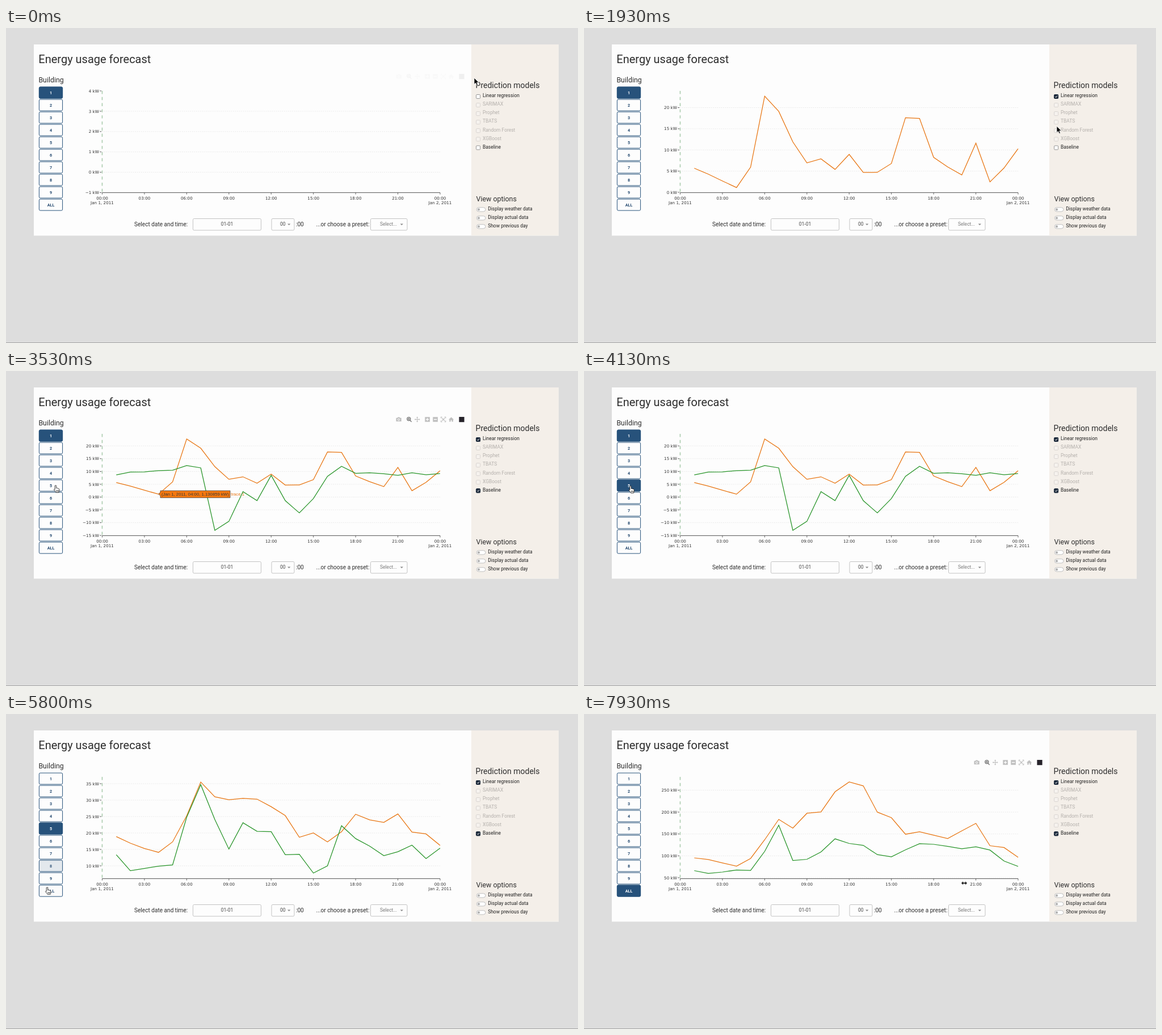
An HTML page for the animation above (8 s loop, 1008 px wide and 556 px high).

```html
<!DOCTYPE html>
<html lang="en">
<head>
<meta charset="utf-8">
<title>Energy usage forecast</title>
<style>
html, body { margin: 0; width: 100%; height: 100%; overflow: hidden; background: #ddd; }
svg { display: block; width: 1008px; height: 556px; font-family: Roboto, sans-serif; }
.plot { font: 7.2px "DejaVu Sans", sans-serif; fill: #333; }
.line { fill: none; stroke-width: 1.25; }
.hover { font: 7.75px "Liberation Sans", Arial, sans-serif; }
.icon { fill: none; stroke: #bfbfbf; stroke-width: 1.3; }
.field { fill: #fdfdfd; stroke: #c3c3c3; }

/* hard switches and fades share one 8 s clock */
.chart, .tick, .hover, .cur { animation: 8s step-end infinite; visibility: hidden; }
.on, #bar, #pointer { animation: 8s linear infinite; }
.on { opacity: 0; }

#chart0 { animation-name: chart0; }
#chart1 { animation-name: chart1; }
#chart2 { animation-name: chart2; }
#chart3 { animation-name: chart3; }
#chart4 { animation-name: chart4; }
@keyframes chart0 { 0% { visibility: visible } 13.33%, to { visibility: hidden } }
@keyframes chart1 { 0% { visibility: hidden } 13.33% { visibility: visible } 34.17%, to { visibility: hidden } }
@keyframes chart2 { 0% { visibility: hidden } 34.17% { visibility: visible } 65.83%, to { visibility: hidden } }
@keyframes chart3 { 0% { visibility: hidden } 65.83% { visibility: visible } 80%, to { visibility: hidden } }
@keyframes chart4 { 0% { visibility: hidden } 80%, to { visibility: visible } }

#tick0 { animation-name: tick0; }
#tick6 { animation-name: tick6; }
@keyframes tick0 { 0% { visibility: hidden } 7.5%, to { visibility: visible } }
@keyframes tick6 { 0% { visibility: hidden } 30%, to { visibility: visible } }

#on1 { animation-name: on1; }
#on5 { animation-name: on5; }
#on8 { animation-name: on8; }
#onALL { animation-name: onALL; }
@keyframes on1 { 0%, 61.12% { opacity: 1 } 62.88%, to { opacity: 0 } }
@keyframes on5 {
  0%, 44.15% { opacity: 0 } 45.4% { opacity: .8 } 46.8%, 49% { opacity: 0 }
  50.8%, 75.6% { opacity: 1 } 77.4%, to { opacity: 0 }
}
@keyframes on8 { 0%, 70.8% { opacity: 0 } 71.7% { opacity: .25 } 72.5% { opacity: .12 } 73.6%, to { opacity: 0 } }
@keyframes onALL { 0%, 72.5% { opacity: 0 } 74.4%, to { opacity: 1 } }

#bar { animation-name: bar; }
@keyframes bar {
  0% { opacity: .06 } .87%, 40.87% { opacity: 0 } 42.5%, 44.8% { opacity: 1 }
  47.5%, 91.2% { opacity: 0 } 93.3%, to { opacity: 1 }
}
.hover { animation-name: hover; }
@keyframes hover { 0% { visibility: hidden } 43.3% { visibility: visible } 45%, to { visibility: hidden } }

#pointer { animation-name: move; }
@keyframes move {
  0% { transform: translate(825px, 88px); animation-timing-function: ease-in-out }
  5%, 17.5% { transform: translate(830px, 117px); animation-timing-function: ease-in-out }
  24.12% { transform: translate(833px, 173px); animation-timing-function: ease-out }
  28.4%, 40% { transform: translate(831px, 207px); animation-timing-function: ease-in }
  41.6% { transform: translate(600px, 212px) }
  43.3% { transform: translate(262px, 214px); animation-timing-function: ease-out }
  44.12% { transform: translate(88px, 202px) }
  46.2% { transform: translate(20px, 205px); animation-timing-function: ease-in-out }
  50%, 58% { transform: translate(82px, 203px) }
  60.87%, 70% { transform: translate(76px, 200px); animation-timing-function: ease-in-out }
  72.5% { transform: translate(72.5px, 306px); animation-timing-function: ease-out }
  75%, 89% { transform: translate(75.5px, 309px); animation-timing-function: ease-in }
  93.4% { transform: translate(245px, 303px); animation-timing-function: ease-out }
  99.1%, to { transform: translate(670px, 298.5px) }
}
#arrow { animation-name: arrow; }
#hand { animation-name: hand; }
#resize { animation-name: resize; }
@keyframes arrow {
  0% { visibility: visible } 44% { visibility: hidden } 44.9% { visibility: visible }
  48.7% { visibility: hidden } 60.8% { visibility: visible } 70.7% { visibility: hidden }
  90.5% { visibility: visible } 92.4%, to { visibility: hidden }
}
@keyframes hand {
  0% { visibility: hidden } 44% { visibility: visible } 44.9% { visibility: hidden }
  48.7% { visibility: visible } 60.8% { visibility: hidden } 70.7% { visibility: visible }
  90.5%, to { visibility: hidden }
}
@keyframes resize { 0% { visibility: hidden } 92.4%, to { visibility: visible } }
</style>
</head>
<body>
<svg viewBox="0 0 1008 556">
  <rect width="1008" height="556" fill="#ddd"/>
  <path d="M0 555.5H1008" stroke="#a2a2a2"/>
  <rect x="49" y="29" width="925" height="337.5" fill="#fdfdfd"/>
  <rect x="820" y="29" width="154" height="337.5" fill="#f4efe9"/>

  <g fill="#2d2d2d">
    <text x="57.3" y="62" font-size="20">Energy usage forecast</text>
    <text x="57.4" y="96" font-size="12.4">Building</text>
    <text x="827.6" y="106" font-size="14">Prediction models</text>
    <text x="828.6" y="305.7" font-size="12.4">View options</text>
    <g font-size="10.1">
      <text x="226" y="349.6">Select date and time:</text>
      <text x="511" y="349.6">:00</text>
      <text x="546.6" y="349.6">...or choose a preset:</text>
    </g>
  </g>

  <g class="field">
    <rect x="329.5" y="336.5" width="120" height="20.5" rx="2"/>
    <rect x="468" y="336.5" width="40" height="20.5" rx="2"/>
    <rect x="642.5" y="336.5" width="64.5" height="20.5" rx="2"/>
  </g>
  <g font-size="8.5" fill="#444">
    <text x="389.5" y="349.4" text-anchor="middle">01-01</text>
    <text x="483" y="349.4">00</text>
    <text x="659" y="349.4" fill="#7b7b7b">Select...</text>
    <path d="M496 345.5h5.4l-2.7 2.8zM694.6 345.5h5.4l-2.7 2.8z" fill="#8c8c8c"/>
  </g>

  <g id="buttons" font-size="7.2" font-weight="700" text-anchor="middle"></g>
  <g id="options" font-size="8.46"></g>
  <g id="plot" class="plot"></g>

  <g class="hover">
    <path d="M269 217.3l3-3v-3h123v12.4h-123v-3.4z" fill="#f5780f" stroke="#444" stroke-width=".8"/>
    <text x="274" y="220.1" fill="#3a3a3a">(Jan 1, 2011, 04:00, 1.130859 kW)</text>
    <text x="396.3" y="220.1" fill="#e87511">trace 1</text>
  </g>

  <g id="bar">
    <path d="M687.5 82.8h2.2l.9-1.3h3l.9 1.3h2.2v6.2h-9.2z" fill="#bfbfbf"/>
    <circle cx="692" cy="85.8" r="1.7" fill="#bfbfbf" stroke="#fdfdfd"/>
    <g class="icon">
      <g stroke="#727272"><circle cx="709.8" cy="84.6" r="3"/><path d="M712 87l2.6 2.7M708.2 84.6h3.2M709.8 83v3.2"/></g>
      <path d="M720.5 85.5h8.4M724.7 81.3v8.4" stroke-width="1.1"/>
      <path d="M719.8 85.5l2-1.7v3.4zM729.6 85.5l-2-1.7v3.4zM724.7 80.6l-1.7 2h3.4zM724.7 90.4l-1.7-2h3.4z" fill="#bfbfbf" stroke="none"/>
      <path d="M738.3 81.2h8.6v8.6h-8.6zM752.3 81.2h8.6v8.6h-8.6z" fill="#bfbfbf" stroke="none"/>
      <path d="M740 85.5h5.2M742.6 82.9v5.2M754 85.5h5.2" stroke="#fdfdfd"/>
      <path d="M766.5 83.4v-2h2M772.8 81.4h2v2M774.8 87.6v2h-2M768.5 89.6h-2v-2M768 83l5.3 5M773.3 83l-5.3 5" stroke-width="1.1"/>
      <path d="M780 85.7l4.6-4.2 4.6 4.2h-1.3v3.8h-2.4v-2.7h-1.8v2.7h-2.4v-3.8z" fill="#bfbfbf" stroke="none"/>
    </g>
    <rect x="798.4" y="81" width="9.2" height="9.2" fill="#27242b"/>
  </g>

  <g id="pointer">
    <path id="arrow" class="cur" d="M0 0v11.4l2.6-2.4 1.9 4.2 2-.9-1.8-4.1h3.6z" fill="#000" stroke="#fff" stroke-width=".8"/>
    <path id="hand" class="cur" d="M-1.2 1a1.2 1.2 0 0 1 2.4 0v3.8c.6-.6 1.7-.4 1.9.3.6-.4 1.6-.2 1.8.6.7-.3 1.5.1 1.5 1v2.4c0 1.4-.9 2-.9 3.2H.6c-.2-1.2-2.4-3-3.3-4.5-.5-1 .6-1.7 1.5-.8zM1.4 8.4v2.2M3 8.4v2.2M4.6 8.4v2.2" fill="#fff" stroke="#000" stroke-width=".8"/>
    <path id="resize" class="cur" d="M-5.4 0l3.6-3.4v2.2h3.6v-2.2l3.6 3.4-3.6 3.4v-2.2h-3.6v2.2z" fill="#000" stroke="#fff" stroke-width=".7"/>
  </g>
</svg>

<script>
const $ = id => document.getElementById(id);
const navy = '#27527b';
const text = (x, y, s, extra = '') => `<text x="${x}" y="${y}" ${extra}>${s}</text>`;

// building buttons: plain face with a filled face faded over it
$('buttons').innerHTML = [1, 2, 3, 4, 5, 6, 7, 8, 9, 'ALL'].map((name, i) => {
  const y = 114 + i * 22;
  const face = (fill, ink) =>
    `<rect x="58.4" y="${y - 9.9}" width="41.2" height="20" rx="2" fill="${fill}" stroke="${navy}"/>` +
    text(79, y + 2.6, name, `fill="${ink}"`);
  return face('#fdfdfd', '#254a70') + `<g id="on${name}" class="on">${face(navy, '#fff')}</g>`;
}).join('');

const models = ['Linear regression', 'SARIMAX', 'Prophet', 'TBATS', 'Random Forest', 'XGBoost', 'Baseline'];
const views = ['Display weather data', 'Display actual data', 'Show previous day'];

$('options').innerHTML = models.map((name, i) => {
  const y = 121 + i * 15.05, live = i % 6 === 0;
  const box = `<rect x="828.6" y="${y - 3.5}" width="7" height="7" rx="1.2" `;
  return box + `fill="${live ? '#fff' : '#f6f2ee'}" stroke="${live ? '#8b8b8b' : '#d6d2ce'}" stroke-width=".9"/>` +
    (live ? `<g id="tick${i}" class="tick">${box}fill="#1d2b3c" stroke="#1d2b3c"/>` +
      `<path d="M830.3 ${y}l1.4 1.5 2.5-3" fill="none" stroke="#fff"/></g>` : '') +
    text(840, y + 1.3, name, `fill="${live ? '#222' : '#b4b0ac'}"`);
}).join('') + views.map((name, i) => {
  const y = 320.4 + i * 15;
  return `<rect x="829.3" y="${y - 3.6}" width="15.6" height="7.2" rx="3.6" fill="#fff" stroke="#b9b9b9" stroke-width=".9"/>` +
    `<circle cx="833" cy="${y}" r="2.1" fill="#b0b0b0"/>` + text(849.2, y + 1.8, name, 'fill="#222"');
}).join('');

// hourly forecasts in kW, 01:00 to 24:00
const linear1 = [5.69, 4.28, 2.68, 1.13, 5.95, 22.7, 19.1, 11.9, 6.96, 7.9, 5.4, 8.96,
  4.7, 4.72, 6.8, 17.6, 17.45, 8.25, 6, 4.1, 11.6, 2.45, 5.75, 10.3];
const base1 = [8.65, 9.8, 9.83, 10.35, 10.5, 12.3, 11.4, -13, -9.5, 2.1, -1.4, 8.5,
  -1.4, -6.2, -.6, 8.1, 12, 9.3, 9.5, 9.1, 8.5, 9.5, 8.75, 9.2];
const linear5 = [18.9, 16.9, 15.3, 14.1, 17.3, 25.2, 35.5, 31, 30.1, 30.55, 30.3, 28,
  25.3, 18.7, 20, 17.3, 20.4, 25.7, 24, 23.2, 25.8, 20.3, 19.7, 16.2];
const base5 = [13.4, 8.5, 9.2, 9.9, 10.3, 24.8, 34.7, 24.1, 15.1, 23.1, 20.5, 20.4,
  13.4, 13.5, 7.8, 10, 22.2, 18.3, 16, 13.1, 14.3, 16.3, 12.2, 15.4];
const linearAll = [95.3, 91.7, 83.9, 76.5, 94, 136.7, 183.3, 163.3, 197.3, 200.2, 246.4, 268.8,
  260, 199.9, 187.2, 149.4, 155.1, 147.3, 139.6, 157.2, 174.3, 123.1, 118.9, 96.6];
const baseAll = [66.2, 60, 62.9, 67.7, 66.8, 110.2, 170, 89.5, 92.1, 108.9, 138.9, 128.3,
  124, 102.8, 97.9, 113.7, 127.7, 126.4, 121.6, 116.3, 120.8, 113.2, 88.2, 75.9];

// zero: y of 0 kW, k: pixels per kW
const charts = [
  { zero: 254.6, k: 35.9, from: -1, to: 4, step: 1, data: [] },
  { zero: 290, k: 7.475, from: 0, to: 20, step: 5, data: [linear1] },
  { zero: 222.5, k: 4.515, from: -15, to: 20, step: 5, data: [linear1, base1] },
  { zero: 326, k: 5.8, from: 10, to: 35, step: 5, data: [linear5, base5] },
  { zero: 327.6, k: .7725, from: 50, to: 250, step: 50, data: [linearAll, baseAll] },
];
const left = 169.5, right = 765;
const hourX = h => left + (right - left) * h / 24;

function drawChart({ zero, k, from, to, step, data }, i) {
  let out = '';
  for (let v = from; v <= to; v += step) {
    const y = zero - v * k;
    if (y > 115 && y < 289.5)
      out += `<path d="M${left} ${y}H${right}" stroke="#e4e4e4" stroke-width=".8" stroke-dasharray="1.8 1.8"/>`;
    out += `<path d="M165 ${y}h3.4" stroke="#444" stroke-width=".8"/>` +
      text(163.8, y + 2.6, `${v < 0 ? '\u2212' : ''}${Math.abs(v)} kW`, 'text-anchor="end"');
  }
  data.forEach((list, n) => {
    const pts = list.map((v, h) => `${hourX(h + 1).toFixed(1)},${(zero - v * k).toFixed(1)}`).join(' ');
    out += `<polyline class="line" points="${pts}" stroke="${n ? '#279428' : '#e87511'}"/>`;
  });
  return `<g id="chart${i}" class="chart">${out}</g>`;
}

let axis = `<path d="M${left} 111V290" stroke="#b2d0b5" stroke-width="1.8" stroke-dasharray="5.4 5.4"/>` +
  `<path d="M${left} 290.6H${right}" stroke="#444" stroke-width=".9"/>`;
for (let h = 0; h <= 24; h += 3) {
  const x = hourX(h), mid = 'text-anchor="middle"';
  axis += `<path d="M${x} 290.6v3.2" stroke="#444" stroke-width=".8"/>` +
    text(x, 302.6, `${String(h % 24).padStart(2, '0')}:00`, mid);
  if (h % 24 === 0) axis += text(x, 311.2, `Jan ${h ? 2 : 1}, 2011`, mid);
}
$('plot').innerHTML = axis + charts.map(drawChart).join('');
</script>
</body>
</html>
```
